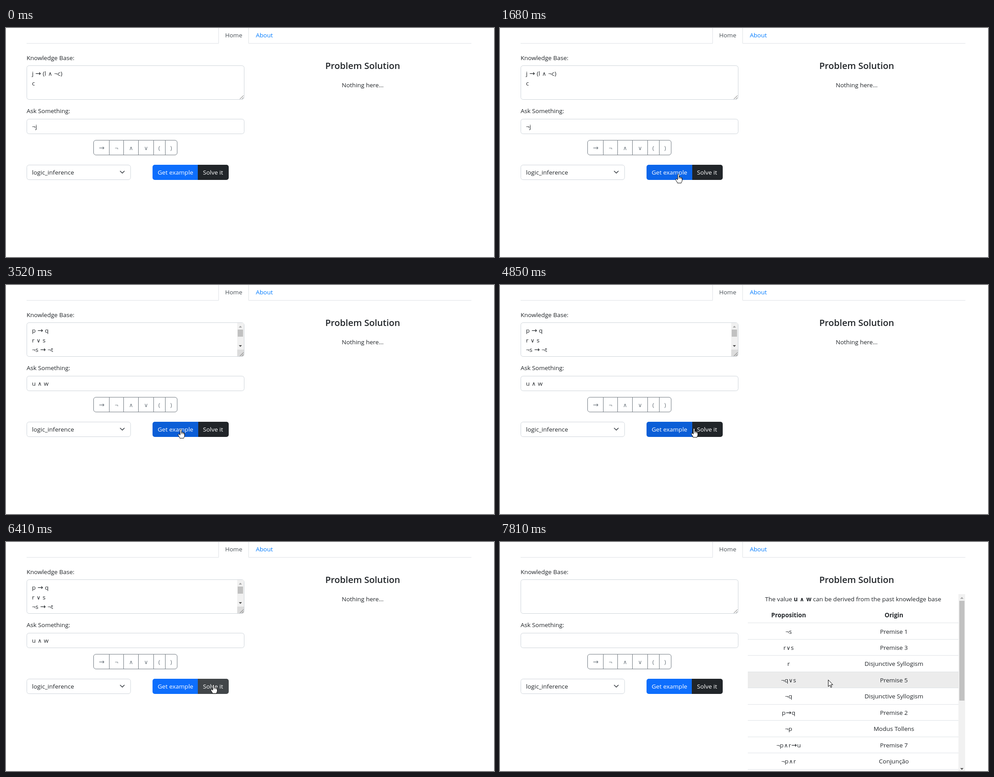
An HTML page for the animation above (8 s loop, 1089x514 px).

```html
<!DOCTYPE html>
<html lang="en">
<head>
<meta charset="utf-8">
<title>Logic inference</title>
<style>
html, body { margin: 0; width: 100%; height: 100%; overflow: hidden; background: #fff; }
svg { display: block; width: 1089px; height: 514px; }
text { font: 13.5px "Open Sans", "Noto Sans", sans-serif; fill: #212529; white-space: pre; }
.mid { text-anchor: middle; }
.bold { font-weight: 700; }
.title { font-size: 20.1px; font-weight: 600; }
.tab { fill: #495057; }
.link { fill: #007bff; }
.light { fill: #fff; }
.key { fill: #6c757d; }
.arrow { font: 15px "DejaVu Sans", sans-serif; letter-spacing: .5px; }
.op { font-family: "DejaVu Sans", sans-serif; font-size: 12.5px; letter-spacing: 1px; }
.key .arrow, .key .op { letter-spacing: 0; }
.rule { stroke: #dee2e6; fill: none; }
.field { stroke: #ced4da; fill: #fff; }
.keys { stroke: #6c757d; fill: none; }
.grip { stroke: #555; fill: none; }
.track { fill: #f1f1f1; }
.thumb { fill: #c1c1c1; }
.off { fill: #a3a3a3; }
.on { fill: #505050; }
.hover { fill: #ececec; }
.pointer { fill: #fff; stroke: #000; stroke-linejoin: round; }

/* Scene switches */
.first, .second, .third, .before, .after, .arrowhead, .hand, .row3, .row4 {
  animation: 8s step-end infinite;
}
.first { animation-name: first; }
.second { animation-name: second; }
.third { animation-name: third; }
.before { animation-name: before; }
.after { animation-name: after; }
.arrowhead { animation-name: arrowhead; }
.hand { animation-name: hand; }
.row3 { animation-name: row3; }
.row4 { animation-name: row4; }
@keyframes first { 0% { opacity: 1 } 27.5%, 100% { opacity: 0 } }
@keyframes second { 0% { opacity: 0 } 27.5% { opacity: 1 } 41.5%, 100% { opacity: 0 } }
@keyframes third { 0% { opacity: 0 } 41.5% { opacity: 1 } 85.1%, 100% { opacity: 0 } }
@keyframes before { 0% { opacity: 1 } 85.1%, 100% { opacity: 0 } }
@keyframes after { 0% { opacity: 0 } 85.1%, 100% { opacity: 1 } }
@keyframes arrowhead { 0% { opacity: 0 } 3.23% { opacity: 1 } 20.1% { opacity: 0 } 92.6%, 100% { opacity: 1 } }
@keyframes hand { 0% { opacity: 0 } 20.1% { opacity: 1 } 92.6%, 100% { opacity: 0 } }
@keyframes row3 { 0% { opacity: 0 } 93.4% { opacity: 1 } 97.6%, 100% { opacity: 0 } }
@keyframes row4 { 0% { opacity: 0 } 97.6%, 100% { opacity: 1 } }

/* Button colours */
.get { fill: #0d6efd; animation: get 8s linear infinite; }
.edge { animation: get 8s linear infinite, edge 8s step-end infinite; }
.solve { fill: #212529; animation: solve 8s linear infinite; }
@keyframes get {
  0%, 20.1% { fill: #0d6efd }
  22% { fill: #0b5ed7 }
  24.7% { fill: #0b5ed7 }
  26.2%, 27.5% { fill: #0a58ca }
  29.4%, 38.8% { fill: #0b5ed7 }
  40.3%, 41.5% { fill: #0a58ca }
  43.5%, 60.8% { fill: #0b5ed7 }
  62.7%, 100% { fill: #0d6efd }
}
@keyframes edge { 0% { opacity: 0 } 20.1% { opacity: 1 } 61.5%, 100% { opacity: 0 } }
@keyframes solve {
  0%, 61.2% { fill: #212529 }
  63.2%, 76% { fill: #424649 }
  76.75%, 78.3% { fill: #4d5154 }
  80.1%, 92.59% { fill: #424649 }
  92.6% { fill: #25292d }
  93.5%, 100% { fill: #212529 }
}

/* The pointer advances in small held steps */
.cursor { animation: move 8s step-end infinite; }
@keyframes move {
  0% { transform: translate(889px, 500px) }
  4.1% { transform: translate(748px, 459px) }
  4.98% { transform: translate(676px, 445px) }
  8.25% { transform: translate(676px, 445px); animation-timing-function: steps(3) }
  10.83% { transform: translate(625px, 427px); animation-timing-function: steps(3) }
  13.41% { transform: translate(510px, 380px); animation-timing-function: steps(3) }
  15.98% { transform: translate(429px, 347px) }
  18.35% { transform: translate(429px, 347px); animation-timing-function: steps(3) }
  20.98% { transform: translate(398px, 328px); animation-timing-function: steps(2) }
  22.73% { transform: translate(390px, 324px) }
  57.1% { transform: translate(390px, 324px); animation-timing-function: steps(4) }
  60.6% { transform: translate(433px, 322px); animation-timing-function: steps(4) }
  64.1% { transform: translate(463px, 320px) }
  92.6% { transform: translate(533px, 283px); animation-timing-function: steps(3) }
  95.1% { transform: translate(660px, 279px); animation-timing-function: steps(2) }
  96.75% { transform: translate(712px, 289px) }
  97.6%, 100% { transform: translate(732px, 309px) }
}
</style>
</head>
<body>
<svg viewBox="0 0 1089 514">
  <path class="rule" d="M46 34.5H474.5V0M541.5 0V34.5H1038.5"/>
  <text class="tab" x="489" y="21">Home</text>
  <text class="link" x="557.5" y="21">About</text>

  <text x="46" y="72">Knowledge Base:</text>
  <rect class="field" x="46.5" y="84.5" width="485" height="76" rx="5"/>
  <text x="46" y="191">Ask Something:</text>
  <rect class="field" x="46.5" y="204.5" width="485" height="33" rx="5"/>

  <g class="first">
    <text class="logic" x="58" y="107">j → (l ∧ ¬c)</text>
    <text class="logic" x="58" y="128.5">c</text>
    <text class="logic" x="58" y="226">¬j</text>
  </g>
  <g class="second">
    <use href="#scroller"/>
    <rect class="thumb" x="517" y="100" width="12" height="24"/>
    <text class="logic" x="58" y="107">t → s</text>
    <text class="logic" x="58" y="128.5">u → ¬s</text>
    <text class="logic" x="58" y="150">¬w</text>
    <text class="logic" x="58" y="226">¬t</text>
  </g>
  <g class="third">
    <use href="#scroller"/>
    <rect class="thumb" x="517" y="100" width="12" height="16"/>
    <text class="logic" x="58" y="107">p → q</text>
    <text class="logic" x="58" y="128.5">r ∨ s</text>
    <text class="logic" x="58" y="150">¬s → ¬t</text>
    <text class="logic" x="58" y="226">u ∧ w</text>
  </g>
  <path class="grip" d="M522 159.5L530 151.5M526.5 159.5L530 156"/>

  <rect class="keys" x="195.5" y="252" width="186.5" height="33" rx="5"/>
  <path class="keys" d="M230.5 252v33M262.5 252v33M295.5 252v33M329.5 252v33M355.5 252v33"/>
  <g id="keys"></g>

  <rect class="field" x="46.5" y="307.5" width="231.5" height="33" rx="5"/>
  <text x="58" y="329">logic_inference</text>
  <path d="M255 321.3l4.5 4.5 4.5-4.5" fill="none" stroke="#343a40" stroke-width="1.6" stroke-linecap="round" stroke-linejoin="round"/>

  <path class="get" d="M428 307H332a5 5 0 0 0-5 5v24a5 5 0 0 0 5 5h96z"/>
  <path class="solve" d="M428 307h64a5 5 0 0 1 5 5v24a5 5 0 0 1-5 5h-64z"/>
  <rect class="edge" x="428" y="307" width="1" height="34"/>
  <text class="light" x="338.5" y="329">Get example</text>
  <text class="light" x="439.5" y="329">Solve it</text>

  <text class="title mid" x="796" y="91.5">Problem Solution</text>
  <text class="before mid" x="796" y="133">Nothing here...</text>

  <g class="after">
    <rect class="hover row3" x="553" y="255" width="470" height="36.5"/>
    <rect class="hover row4" x="553" y="291.5" width="470" height="36.5"/>
    <text class="logic mid" x="788" y="133">The value <tspan class="bold">u ∧ w</tspan> can be derived from the past knowledge base</text>
    <text class="bold mid" x="644" y="169">Proposition</text>
    <text class="bold mid" x="879" y="169">Origin</text>
    <g id="rows"></g>
    <rect class="track" x="1023" y="117" width="15" height="397"/>
    <rect class="thumb" x="1025" y="132" width="11.5" height="224"/>
    <path class="off" d="M1027 127.5h7.4l-3.7-4z"/>
    <path class="on" d="M1027 507.5h7.4l-3.7 4z"/>
  </g>

  <g class="cursor">
    <path class="pointer arrowhead" d="M.5.5V15.5L4 12.2 6.3 17.4 8.5 16.4 6.3 11.4H10.8Z"/>
    <path class="pointer hand" d="M-1.5 1.5C-1.5-.5 1.5-.5 1.5 1.5V7C2 6 4.3 6 4.5 7.5C5 6.7 7 7 7 8.5C7.6 7.8 8.5 8.2 8.5 9.5V14C8.5 17 6.5 18 6.5 20H-2C-2 18-6 14-6 12C-6 10-3.5 10.3-1.5 12.6ZM1.5 7v3.5M4.5 7.5v3M7 8.5v2.5"/>
  </g>

  <defs>
    <g id="scroller">
      <rect class="track" x="516" y="85" width="15" height="60"/>
      <rect x="516" y="145" width="15" height="15" fill="#dcdcdc"/>
      <path class="off" d="M519.5 95.5h7l-3.5-4z"/>
      <path class="on" d="M519.5 135h7l-3.5 4z"/>
    </g>
  </defs>
</svg>
<script>
const fill = (id, items, draw) => {
  document.getElementById(id).innerHTML = items.map(draw).join('');
};

const keys = [['→', 213.5], ['¬', 246.5], ['∧', 279], ['∨', 312.5], ['(', 342], [')', 368.5]];
fill('keys', keys, ([sign, x]) => `<text class="logic key mid" x="${x}" y="274">${sign}</text>`);

const proof = [
  ['¬s', 'Premise 1'],
  ['r∨s', 'Premise 3'],
  ['r', 'Disjunctive Syllogism'],
  ['¬q∨s', 'Premise 5'],
  ['¬q', 'Disjunctive Syllogism'],
  ['p→q', 'Premise 2'],
  ['¬p', 'Modus Tollens'],
  ['¬p∧r→u', 'Premise 7'],
  ['¬p∧r', 'Conjunção']
];
const ruleAt = i => Math.floor(181.6 + 36.5 * i) + .5;
fill('rows', proof, ([formula, origin], i) => {
  const y = 205.5 + 36.45 * i;
  return `<path class="rule" d="M553 ${ruleAt(i)}H1023"/>
    <text class="logic mid" x="644" y="${y}">${formula}</text>
    <text class="mid" x="879" y="${y}">${origin}</text>`;
});
document.getElementById('rows').insertAdjacentHTML('beforeend',
  `<path class="rule" d="M553 ${ruleAt(proof.length)}H1023"/>`);

// Operators get their own font and spacing
for (const el of document.querySelectorAll('.logic')) {
  const dx = el.classList.contains('key') ? 0 : 1;
  el.innerHTML = el.innerHTML
    .replace(/→/g, `<tspan class="arrow" dx="${dx / 2}">→</tspan>`)
    .replace(/[∧∨]/g, sign => `<tspan class="op" dx="${dx}">${sign}</tspan>`);
}
</script>
</body>
</html>
```
